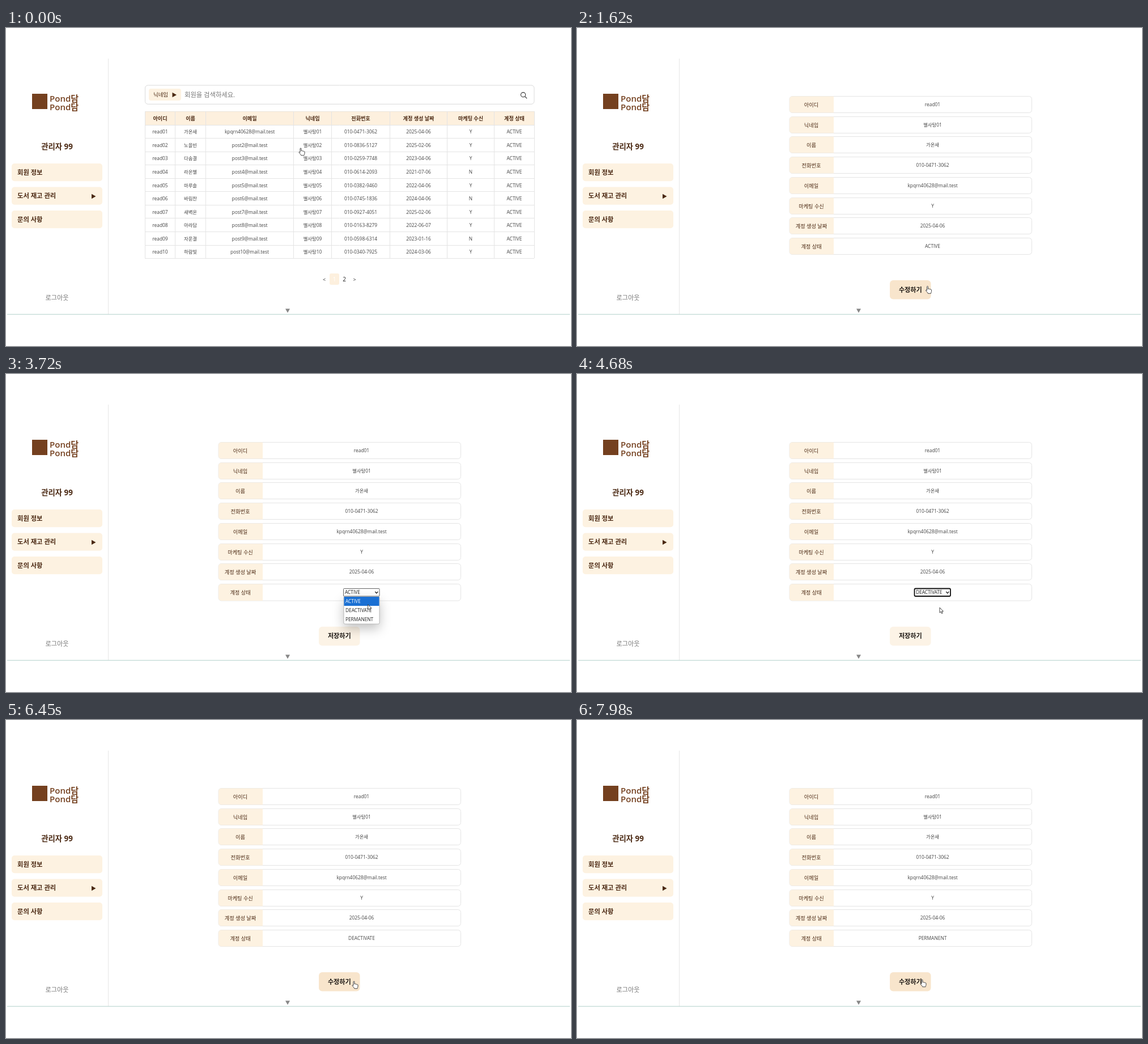
An HTML page with a canvas for the animation above (8 s loop, 997 by 561 pixels).

```html
<!DOCTYPE html>
<html lang="ko">
<head>
<meta charset="utf-8">
<style>
  html, body { margin: 0; width: 100%; height: 100%; overflow: hidden; background: #fff; }
  canvas { display: block; }
</style>
</head>
<body>
<canvas id="stage" width="997" height="561"></canvas>
<script>
const g = document.getElementById('stage').getContext('2d');
const FONT = '"Open Sans", "Noto Sans CJK KR", "Noto Sans CJK", sans-serif';
const CREAM = '#fdf2e1', BROWN = '#4b2913', LINE = '#e4e4e4', INK = '#444';
const LOOP = 8000;

const HEADS = ['아이디', '이름', '이메일', '닉네임', '전화번호', '계정 생성 날짜', '마케팅 수신', '계정 상태'];
const EDGES = [245.5, 298.5, 352.5, 507.5, 574.5, 677.5, 778.5, 861.5, 932.5];
// name, phone, creation date, marketing consent
const MEMBERS = [
  ['가온새', '010-0471-3062', '2025-04-06', 'Y'],
  ['노을빈', '010-0836-5127', '2025-02-06', 'Y'],
  ['다솜결', '010-0259-7748', '2023-04-06', 'Y'],
  ['라온별', '010-0614-2093', '2021-07-06', 'N'],
  ['마루솔', '010-0382-9460', '2022-04-06', 'Y'],
  ['바림찬', '010-0745-1836', '2024-04-06', 'N'],
  ['새벽온', '010-0927-4051', '2025-02-06', 'Y'],
  ['아라담', '010-0163-8279', '2022-06-07', 'Y'],
  ['자운결', '010-0598-6314', '2023-01-16', 'N'],
  ['하람빛', '010-0340-7925', '2024-03-06', 'Y']
].map(([name, phone, date, yes], i) => {
  const no = String(i + 1).padStart(2, '0');
  const mail = (i ? 'post' + (i + 1) : 'kpqrn40628') + '@mail.test';
  return ['read' + no, name, mail, '별사탕' + no, phone, date, yes, 'ACTIVE'];
});
const DETAIL_ORDER = [0, 3, 1, 4, 2, 6, 5, 7];
const OPTIONS = ['ACTIVE', 'DEACTIVATE', 'PERMANENT'];

// pointer hot spot: time, x, y
const PATH = [
  [0, 519, 212], [480, 519, 212], [1050, 536, 183], [1300, 536, 183],
  [1620, 617.5, 455.5], [2000, 611, 464], [2400, 611, 464], [2940, 622.5, 447.5],
  [3250, 643, 385], [3480, 643, 385], [3850, 637, 415], [4250, 637, 415],
  [4680, 640, 412], [5000, 612, 460], [5280, 612, 460], [5760, 651, 467],
  [6080, 651, 467], [6350, 613, 461], [6520, 613, 461], [6760, 643, 385],
  [6860, 643, 385], [7020, 641.5, 411.5], [7260, 637, 432], [7460, 637, 432],
  [7720, 608, 458], [8000, 608, 458]
];
// start time, screen, chosen option, select focused
const STATES = [
  [0, 'table', 0], [1320, 'view', 0], [2280, 'edit', 0], [3420, 'open', 0],
  [4170, 'edit', 1, true], [5220, 'view', 1], [6480, 'edit', 1], [6840, 'open', 1],
  [7410, 'edit', 2, true], [7830, 'view', 2]
];

const HAND = new Path2D('M0 1C0-.4 2-.4 2 1V5C2.5 4.2 4 4.4 4.1 5.3C4.7 4.6 6 4.9 6.1 5.8C6.9 5.2 8 5.7 8 6.8V9C8 10.4 7.2 11 7 12.8H1.8C1.6 11.2-1.8 8.6-2 7.4C-2.1 6.5-1 6.3 0 7.5Z');
const ARROW = new Path2D('M0 0V9.2L2.1 7.2L3.6 10.6L5.1 9.9L3.7 6.7H6.4Z');

function text(s, x, y, size, { color = INK, weight = 400, align = 'center' } = {}) {
  g.font = `${weight} ${size}px ${FONT}`;
  g.fillStyle = color;
  g.textAlign = align;
  g.fillText(s, x, y + size * .36);
}

function box(x, y, w, h, r, fill, stroke, width = 1) {
  g.beginPath();
  g.roundRect(x, y, w, h, r);
  if (fill) { g.fillStyle = fill; g.fill(); }
  if (stroke) { g.strokeStyle = stroke; g.lineWidth = width; g.stroke(); }
}

function line(color, width, ...p) {
  g.beginPath();
  for (let i = 0; i < p.length; i += 2) g.lineTo(p[i], p[i + 1]);
  g.strokeStyle = color;
  g.lineWidth = width;
  g.stroke();
}

function poly(color, ...p) {
  g.beginPath();
  for (let i = 0; i < p.length; i += 2) g.lineTo(p[i], p[i + 1]);
  g.fillStyle = color;
  g.fill();
}

const play = (x, y) => poly(BROWN, x, y - 4.3, x + 7.5, y, x, y + 4.3);

function drawFrame() {
  line('#e6e6e6', 1, 180.5, 54, 180.5, 505);
  line('#cbdfdc', 1.4, 2, 505.3, 995, 505.3);
  poly('#888', 493, 495.3, 501, 495.3, 497, 502.5);

  box(46, 116, 27, 27, 0, '#74401f');
  for (const y of [125, 139.5])
    text('Pond담', 77, y, 15, { color: '#74401f', weight: 600, align: 'left' });

  text('관리자 99', 90, 209, 13.4, { color: BROWN, weight: 700 });
  ['회원 정보', '도서 재고 관리', '문의 사항'].forEach((s, i) => {
    const y = 239 + i * 41.5;
    box(10, y, 160, 31.3, 5, CREAM);
    text(s, 20, y + 15.8, 11.3, { color: BROWN, weight: 700, align: 'left' });
  });
  play(151, 297);
  text('로그아웃', 90, 476, 11.2, { color: '#777' });
}

function drawTable() {
  box(245.5, 101, 686.5, 33.3, 5, '#fff', '#dadada');
  box(252, 107, 57, 21, 4, CREAM);
  text('닉네임', 273, 117.5, 9.5, { color: BROWN });
  play(293.5, 118);
  text('회원을 검색하세요.', 315, 117.5, 11.3, { color: '#777', align: 'left' });
  g.beginPath();
  g.arc(912.6, 117.7, 4.1, 0, 7);
  g.strokeStyle = '#333';
  g.lineWidth = 1.1;
  g.stroke();
  line('#333', 1.2, 915.6, 120.7, 919.2, 124.3);

  box(245.5, 147, 687, 24, 0, '#fdf0de');
  const mid = c => (EDGES[c] + EDGES[c + 1]) / 2;
  HEADS.forEach((s, c) => text(s, mid(c), 159.5, 9.1, { color: BROWN, weight: 700 }));
  MEMBERS.forEach((row, r) => row.forEach((s, c) => text(s, mid(c), 183.3 + r * 23.57, 8.4)));
  for (let r = 0; r < 11; r++) {
    const y = Math.round(170.5 + r * 23.57) + .5;
    line(LINE, 1, 245, y, 932, y);
  }
  line('#ece4d8', 1, 245, 147.5, 932, 147.5);
  EDGES.forEach(x => line(LINE, 1, x, 147, x, 406));

  box(571, 433, 17, 20, 3, '#fdf0de');
  text('<', 561.5, 443.5, 9, { color: '#333' });
  text('1', 579.5, 443.5, 10, { color: '#fff' });
  text('2', 597, 443.5, 10, { color: '#222' });
  text('>', 615, 443.5, 9, { color: '#333' });
}

function drawSelect(value, focused) {
  box(595.5, 378.5, 63.5, 13.5, focused ? 2 : 1, '#fff', focused ? '#111' : '#666', focused ? 1.8 : 1);
  text(value, 598, 385.5, 8.3, { color: '#222', align: 'left' });
  line('#222', 1.3, 651.3, 384, 653.8, 386.7, 656.3, 384);
}

function drawList(active) {
  g.save();
  g.shadowColor = 'rgba(0,0,0,.25)';
  g.shadowBlur = 20;
  g.shadowOffsetY = 8;
  box(596, 393, 63, 48, 2, '#fff');
  g.restore();
  box(596, 393, 63, 48, 2, '#fff', '#aaa', .8);
  OPTIONS.forEach((s, i) => {
    const on = i === active;
    if (on) box(596.5, 409 + (i - 1) * 16, 62, 16, 0, '#1b70d3');
    text(s, 599, 401.2 + i * 16, 8.3, { color: on ? '#fff' : '#222', align: 'left' });
  });
}

function drawDetail(screen, choice, focused, hover, x, y) {
  const editing = screen !== 'view';
  DETAIL_ORDER.forEach((field, i) => {
    const top = Math.round(120 + i * 35.72) + .5, h = editing && i === 7 ? 29.5 : 29;
    box(375, top, 427.5, h, 5, '#fff', LINE);
    box(375, top, 78, h, [5, 0, 0, 5], CREAM);
    text(HEADS[field], 413.5, top + 14.8, 9.2, { color: BROWN, weight: 500 });
    if (i < 7) text(MEMBERS[0][field], 627.5, top + 14.8, 8.4);
    else if (!editing) text(OPTIONS[choice], 627.5, top + 14.8, 8.4);
  });
  const top = editing ? 445.7 : 445;
  box(552, top, 72.5, 33.5, 6, hover ? '#f8e5cc' : '#fcf3e6');
  text(editing ? '저장하기' : '수정하기', 588.3, top + 16.8, 11.1, { color: '#1c1713', weight: 700 });
  if (!editing) return;
  drawSelect(OPTIONS[choice], focused);
  if (screen === 'open') {
    const inList = x > 596 && x < 659 && y > 393 && y < 441;
    drawList(inList ? Math.floor((y - 393) / 16) : choice);
  }
}

function pointerAt(t) {
  const i = PATH.findIndex(p => p[0] > t);
  const [t0, x0, y0] = PATH[i - 1], [t1, x1, y1] = PATH[i];
  const u = (t - t0) / (t1 - t0), e = u * u * (3 - 2 * u);
  return [x0 + (x1 - x0) * e, y0 + (y1 - y0) * e];
}

function drawPointer(x, y, hand) {
  g.save();
  g.translate(x, y);
  const shape = hand ? HAND : ARROW;
  g.fillStyle = '#fff';
  g.strokeStyle = '#333';
  g.lineWidth = .9;
  g.lineJoin = 'round';
  g.fill(shape);
  g.stroke(shape);
  g.restore();
}

function draw(t) {
  const [, screen, choice, focused] = STATES.findLast(s => s[0] <= t);
  const [x, y] = pointerAt(t);
  const onButton = x > 552 && x < 624.5 && y > 445 && y < 479;
  g.fillStyle = '#fff';
  g.fillRect(0, 0, 997, 561);
  drawFrame();
  if (screen === 'table') drawTable();
  else drawDetail(screen, choice, focused, onButton, x, y);
  drawPointer(x, y, screen === 'table' || onButton);
}

const start = performance.now();
function tick() {
  draw((performance.now() - start) % LOOP);
  requestAnimationFrame(tick);
}
tick();
</script>
</body>
</html>
```
